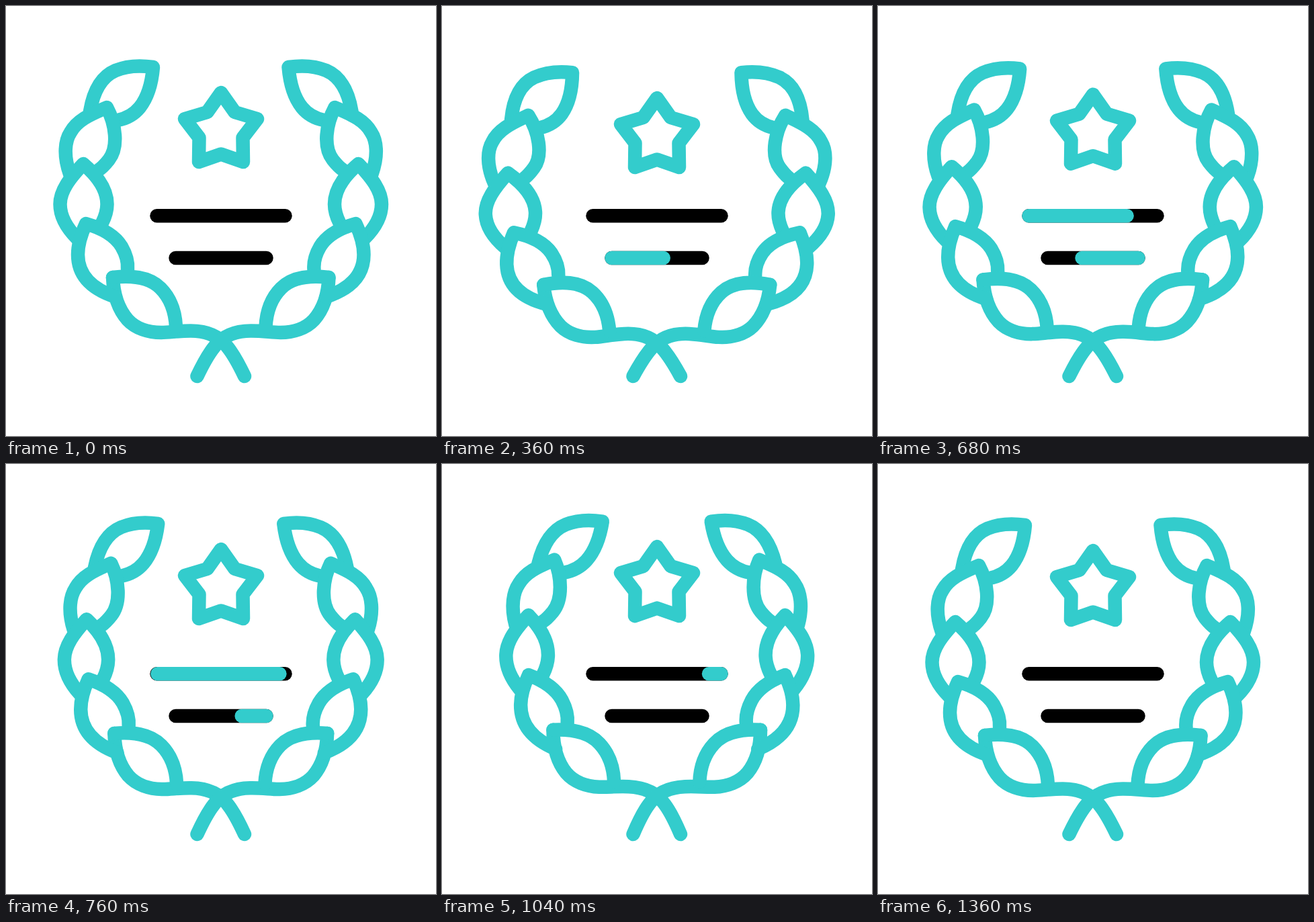
Recreate the animation shown at these times as an HTML page. Size 640x640 px, loop 1.48 s.

```html
<!DOCTYPE html>
<html lang="en">
<head>
<meta charset="utf-8">
<title>Laurel award</title>
<style>
  html, body { margin: 0; width: 100%; height: 100%; overflow: hidden; background: #fff; }
  svg { display: block; width: 100%; height: 100%; }
  path, line {
    fill: none; stroke: #33cccc; stroke-width: 20.5;
    stroke-linecap: round; stroke-linejoin: round;
    vector-effect: non-scaling-stroke;
  }
  .ink { stroke: #000; }
</style>
</head>
<body>
<svg viewBox="0 0 640 640">
  <g id="branch">
    <path d="M159 404C160 430 168 452 181 467C193 480 212 486 231 486C245 486 255 483.500 275 483.500C300 483.500 318 492 330 508C338 518 345 530 355 551"/>
  </g>
  <use href="#branch" transform="translate(639.5) scale(-1 1)"/>
  <path id="star" d="M320 129L340.500 158L374 168L352.500 196L353 232L320 220.500L287 232L287.500 196L266 168L299.500 158Z"/>
  <line class="ink" x1="224.500" y1="312.200" x2="415.500" y2="312.200"/>
  <line class="ink" x1="252.500" y1="375" x2="387.500" y2="375"/>
  <line id="upper" y1="312.200" y2="312.200"/>
  <line id="lower" y1="375" y2="375"/>
</svg>
<script>
const LOOP = 1480, STEP = 40;
const byId = id => document.getElementById(id);
const branch = byId('branch'), star = byId('star');

// Each leaf: outline, tip, axis angle and how far it slims across that axis
const leaves = [
  { d: 'M125 157C130 127 142 105 163 96C180 89 199 88 219 91C217 115 211 136 199 151C190 162 177 168 166 170',
    x: 219, y: 91, axis: 42, flex: 0.08 },
  { d: 'M95 250C85 222 88 200 96 188C107 168 130 160 150 151C163 175 168 210 153 229C149 234 144 240 138 244',
    x: 150, y: 151, axis: 19, flex: 0.09 },
  { d: 'M106 346C90 330 80.500 313 80.500 295C80.500 275 95 256 115 235C135 252 150.500 273 150.500 295C150.500 305 147 315 143 323',
    x: 115, y: 235, axis: 0, flex: 0.13 },
  { d: 'M163 433C130 422 107 403 107 370C107 352 113 337 119 324C140 330 161 340 172 358C179 370 182 380 181 392',
    x: 119, y: 324, axis: -29.6, flex: 0.09 },
  { d: 'M159 404C185 401 212 402 230 420C246 436 252 455 253 478',
    x: 159, y: 404, axis: -51, flex: 0.07 }
];
for (const leaf of leaves) {
  leaf.el = document.createElementNS('http://www.w3.org/2000/svg', 'path');
  leaf.el.setAttribute('d', leaf.d);
  branch.append(leaf.el);
}

// Eased progress from time a to time b
function ease(t, a, b) {
  const u = Math.min(1, Math.max(0, (t - a) / (b - a)));
  return u * u * (3 - 2 * u);
}

// From rest to the open value, on to the closed value, back to rest
const swing = (t, open, closed) =>
  open * ease(t, 80, 480) + (closed - open) * ease(t, 480, 920) - closed * ease(t, 920, 1360);

function trim(el, x, length, from, to) {
  el.setAttribute('x1', x + length * from);
  el.setAttribute('x2', x + length * to);
  el.setAttribute('visibility', to > 0 && from < 1 ? 'visible' : 'hidden');
}

function draw(t) {
  branch.setAttribute('transform', `rotate(${swing(t, -4, 3)} 355 551)`);
  star.setAttribute('transform', `translate(0 ${swing(t, 10.2, -7.2)})`);
  const pinch = swing(t, -0.6, 1);
  for (const { el, x, y, axis, flex } of leaves) {
    el.setAttribute('transform',
      `translate(${x} ${y}) rotate(${axis}) scale(${1 - flex * pinch} 1) rotate(${-axis}) translate(${-x} ${-y})`);
  }
  trim(byId('lower'), 252.5, 135, ease(t, 540, 875), ease(t, 166, 520));
  trim(byId('upper'), 224.5, 191, ease(t, 746, 1110), ease(t, 393, 812));
}

const start = performance.now();
function tick() {
  const t = (performance.now() - start + 0.5) % LOOP;
  draw(Math.floor(t / STEP) * STEP);
  requestAnimationFrame(tick);
}
tick();
</script>
</body>
</html>
```
